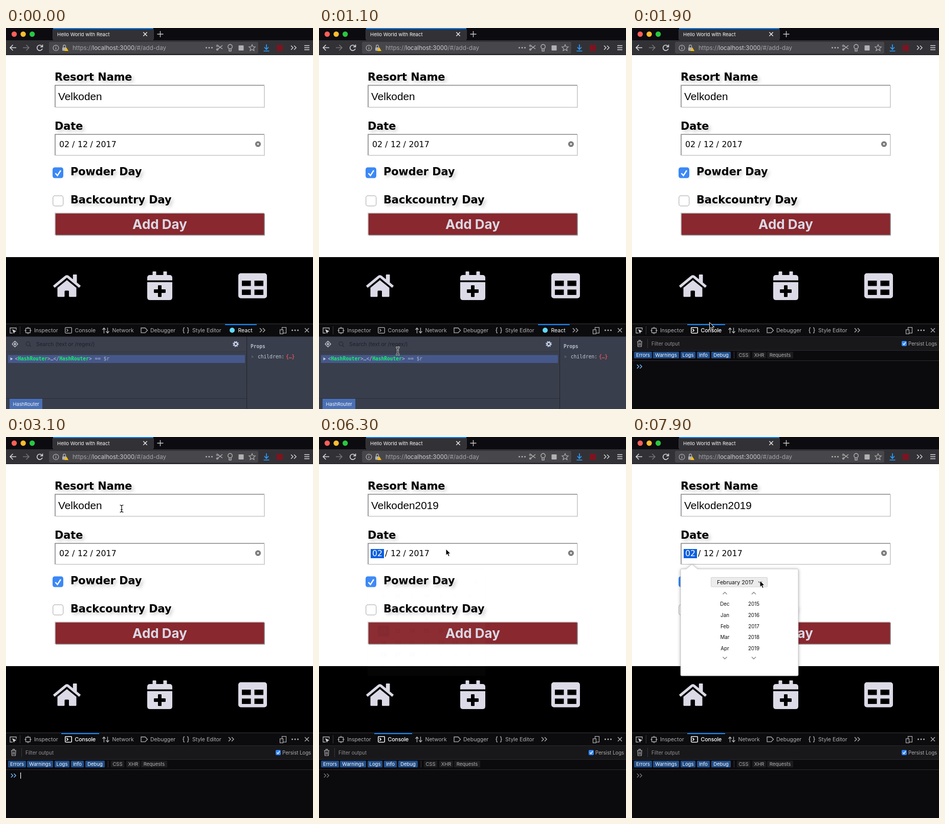
Recreate the animation shown at these times as an HTML page. Size 600 px wide and 745 px high, loop 8000 ms.

```html
<!DOCTYPE html>
<html lang="en">
<head>
<meta charset="utf-8">
<title>Add day form</title>
<style>
html, body { margin: 0; width: 100%; height: 100%; overflow: hidden; background: #fff; }
svg { display: block; font-family: Inter, "Open Sans", sans-serif; }
text { white-space: pre; }
.label { font: bold 20.8px "DejaVu Sans", sans-serif; filter: drop-shadow(4px 4px 3px rgba(0,0,0,.2)); }
.field { font: 20.8px "Liberation Sans", sans-serif; }
.date { font: 15.8px "DejaVu Sans", sans-serif; }
.mono { font: 9.6px "DejaVu Sans Mono", monospace; }
.bold { font-weight: bold; }
.mid { text-anchor: middle; }
</style>
</head>
<body>
<svg id="stage" width="600" height="745" viewBox="0 0 600 745"></svg>
<script>
const LOOP = 8000, STEP = 100;
const RESORT = 'Velkoden', TYPED = '2019', KEYS = [3800, 4100, 4300, 4500];
const CLICK = { tab: 1500, resort: 3400, date: 6100, popup: 6300, month: 7400 };
const GREY = '#b1b1b3', BLUE = '#0a84ff', ICON = '#dcdae6';

const rect = (x, y, w, h, fill, more = '') =>
  `<rect x="${x}" y="${y}" width="${w}" height="${h}" fill="${fill}" ${more}/>`;
const text = (x, y, s, size, fill, cls = '', id = '') =>
  `<text x="${x}" y="${y}" font-size="${size}" fill="${fill}" class="${cls}" id="${id}">${s}</text>`;
const line = (d, stroke, w = 1, more = '') =>
  `<path d="${d}" fill="none" stroke="${stroke}" stroke-width="${w}" ${more}/>`;
const dot = (x, y, r, fill, more = '') => `<circle cx="${x}" cy="${y}" r="${r}" fill="${fill}" ${more}/>`;
const ring = (x, y, r, stroke, w = 1) => dot(x, y, r, 'none', `stroke="${stroke}" stroke-width="${w}"`);
const cross = (x, y, r, color, w) =>
  line(`M${x - r} ${y - r}l${2 * r} ${2 * r}m0 ${-2 * r}l${-2 * r} ${2 * r}`, color, w);
const dots = (x, y, color) => [-5.5, 0, 5.5].map(d => dot(x + d, y, 1.5, color)).join('');
const chevrons = (x, y, color, r = 4) =>
  line(`M${x - r - 1} ${y - r}l${r} ${r}l${-r} ${r}M${x + 1} ${y - r}l${r} ${r}l${-r} ${r}`, color, 1.4);
const bevel = (x, y, w, h, lit, shade, fill) =>
  rect(x, y, w, h, fill, 'rx="3"') +
  line(`M${x + w} ${y + 1}V${y + h}H${x + 1}`, shade, 1.6) +
  line(`M${x} ${y + h}V${y}H${x + w}`, lit, 1.6);

function browserBar() {
  const lights = ['#ff5f57', '#febc2e', '#28c840'];
  return rect(0, 0, 600, 25, '#0c0b10') + rect(92, 0, 196, 25, '#323236') + rect(92, 0, 196, 2, BLUE) +
    lights.map((c, i) => dot(16 + 17.6 * i, 12, 5.2, c)).join('') +
    text(100, 16, 'Hello World with React', 9.6, '#f9f9fa') + cross(272, 12, 3.7, '#eee', 1.4) +
    line('M301.5 6v12m-6-6h12', '#ccc', 1.3) + line('M288.5 3v19M91.5 3v19', '#38383d') +
    rect(0, 24, 600, 29, '#323236') + rect(0, 52, 600, 1, '#17171a') +
    rect(84, 27, 409, 23, '#47474b', 'rx="3"') +
    line('M20 38.500h-12m5.500-5.500l-5.500 5.500l5.500 5.500', '#d7d7db', 1.6) +
    line('M33 38.500h12m-5.500-5.500l5.500 5.500l-5.500 5.500', '#737377', 1.6) +
    line('M70.500 36a5.300 5.300 0 1 0 .5 4.500M71.500 32.500v4.500h-4.500', '#d7d7db', 1.6) +
    ring(97.5, 39, 5.4, GREY, 1.2) + line('M97.500 38v4m0-6.500v1.300', GREY, 1.3) +
    rect(110, 38, 8, 6.5, GREY, 'rx="1"') + line('M111.800 38v-2.500a2.300 2.300 0 0 1 4.600 0v2.500', GREY, 1.4) +
    '<path d="M118 38l4 7h-8z" fill="#ffbf00"/>' +
    text(130, 43, 'https://<tspan fill="#cfcfd2">localhost:3000</tspan>/#/add-day', 11.6, '#a4a4a8') +
    dots(397, 38.5, GREY) +
    line('M412 33l11 8M412 43l11-9', GREY, 1.3) + ring(413, 35, 1.8, GREY) + ring(413, 42, 1.8, GREY) +
    ring(438, 36.5, 4.2, GREY, 1.4) + line('M436 41v4h4v-4', GREY, 1.4) +
    rect(454.500, 34, 10, 10, GREY, 'rx="1"') +
    line('M481 32.500l1.800 4 4.400.4-3.300 3 1 4.300-3.900-2.300-3.900 2.300 1-4.300-3.300-3 4.400-.4z', GREY, 1.2) +
    line('M509 32v10m-4-4.500l4 4.500l4-4.500M503.500 45h11', '#2b9cff', 1.7) +
    rect(529, 33, 12, 12, '#7c1420') + chevrons(562, 38.5, '#d7d7db') +
    line('M583 34.500h10m-10 4h10m-10 4h10', '#d7d7db', 1.6);
}

function form() {
  return rect(0, 53, 600, 395, '#fff') +
    [['Resort Name', 95, 103], ['Date', 95, 199], ['Powder Day', 126, 288], ['Backcountry Day', 126, 343]]
      .map(([s, x, y]) => text(x, y, s, 20.8, '#000', 'label')).join('') +
    bevel(96, 112, 409, 43, '#87878a', '#c8c8ca', '#fff') + bevel(96, 208, 409, 41, '#87878a', '#c8c8ca', '#fff') +
    text(102, 141, RESORT, 20.8, '#000', 'field', 'resort') + rect(0, 122, 1.3, 25, '#000', 'id="caret"') +
    rect(101, 219, 26, 18, '#0a5fe0', 'id="segment"') + text(104, 233, '02', 15.8, '#000', 'date', 'month') +
    [[129, '/'], [140, '12'], [164.5, '/'], [175.5, '2017']].map(([x, s]) => text(x, 233, s, 15.8, '#000', 'date')).join('') +
    dot(492.5, 227, 5.5, '#737376') + cross(492.5, 227, 2.1, '#fff', 1.3) +
    rect(91, 272.5, 21, 21, '#3b88f6', 'rx="4.500"') + line('M96.500 284l4 4.500l6.500-10', '#fff', 2.4) +
    rect(91.700, 328, 20, 20, '#fff', 'rx="4" stroke="#c2c2c5" stroke-width="1.500"') +
    bevel(96, 362, 409, 43, '#bdb9bb', '#858184', '#89282e') +
    text(300.5, 393, 'Add Day', 26, '#dad8e4', 'mid bold');
}

function nav() {
  const cells = [461, 485.5].flatMap(x => [494, 511.5].map(y => rect(x, y, 17.5, 10.5, '#000'))).join('');
  return rect(0, 448, 600, 130, '#000') +
    line('M93.500 506L117 486.500q2-1.500 4 0L144.500 506', ICON, 5, 'stroke-linejoin="round"') +
    rect(130.8, 482, 7.7, 16, ICON, 'rx="1"') +
    `<path d="M100.500 508L119 493l18.500 15v16.500q0 1.200-1.500 1.200h-11.500q-1.500 0-1.500-1.500V515q0-1.500-1.500-1.500h-5.500q-1.500 0-1.500 1.500v9.200q0 1.500-1.500 1.500H102q-1.500 0-1.500-1.200z" fill="${ICON}"/>` +
    `<path d="M276 493.500v-5q0-5.500 5.500-5.500h38q5.500 0 5.500 5.500v5zM276 497h49v29.500q0 5.500-5.500 5.500h-38q-5.500 0-5.500-5.500z" fill="${ICON}"/>` +
    rect(286.5, 476, 7, 10, ICON, 'rx="1"') + rect(307.5, 476, 7, 10, ICON, 'rx="1"') +
    rect(289, 511, 23, 7, '#000', 'rx="1.200"') + rect(297, 503, 7, 23, '#000', 'rx="1.200"') +
    rect(454, 479.5, 56, 49, ICON, 'rx="5"') + cells;
}

const consoleIcon = c => rect(115.7, 585.7, 12.6, 11, 'none', `rx="1.500" stroke="${c}" stroke-width="1.300"`) +
  line('M118.500 588.500l2.700 2.700l-2.700 2.700', c, 1.3);

function toolTabs() {
  const names = [[55, 'Inspector'], [134.5, 'Console'], [207.5, 'Network'], [282, 'Debugger'], [364, 'Style Editor']];
  return rect(0, 578, 600, 26, '#0c0c0e') + rect(0, 578, 600, 1, '#38383d') + rect(0, 603, 600, 1, '#2a2a2e') +
    names.map(([x, s]) => text(x, 595, s, 10.5, GREY)).join('') +
    line('M13 596.500h-5v-10h12v4', GREY, 1.3) + '<path d="M12 589l8.500 4-3.500 1.200-1.500 3.500z" fill="#d7d7db"/>' +
    line('M27.500 583v16', '#38383d') +
    rect(38.5, 587, 9, 9, 'none', `rx="1" stroke="${GREY}" stroke-width="1.300"`) +
    line('M43 584.500v3m0 8v3m-6.500-7h3m7 0h3', GREY, 1.3) + consoleIcon(GREY) +
    line('M191.500 597v-10m-3 3l3-3.500l3 3.500M198.500 586v10m-3-3l3 3.500l3-3.500', GREY, 1.3) +
    line('M264 586.500h8l4.500 4.700-4.500 4.700h-8z', GREY, 1.3) +
    line('M349 586q-2 0-2 2v1.500q0 1.700-1.500 1.700q1.500 0 1.500 1.700v1.500q0 2 2 2M354 586q2 0 2 2v1.500q0 1.700 1.500 1.700q-1.500 0-1.500 1.700v1.500q0 2-2 2', GREY, 1.3) +
    rect(539.5, 585.5, 8, 11, 'none', `stroke="${GREY}" stroke-width="1.200"`) +
    rect(535.5, 590, 6, 8, '#0c0c0e', `stroke="${GREY}" stroke-width="1.200"`) +
    dots(565, 591, GREY) + cross(588, 591, 4, GREY, 1.4);
}

function reactPanel() {
  const green = s => `<tspan class="bold" fill="#12f56a">${s}</tspan>`;
  return rect(428, 579, 62, 2, BLUE) + dot(442, 591, 5, '#61dafb') + text(453.5, 595, 'React', 10.5, '#fff') +
    chevrons(501, 591, GREY) + rect(0, 604, 600, 141, '#393e4c') + rect(0, 604, 470, 28, '#3c404d') +
    rect(0, 632, 470, 1, '#343946') + rect(470, 604, 1, 141, '#20232b') +
    ring(17.5, 618, 4.3, '#d0d3da', 1.2) + dot(17.5, 618, 2, '#d0d3da') +
    line('M17.500 611.500v3m0 7v3m-6.500-6.500h3m7 0h3', '#d0d3da', 1.2) +
    ring(43, 617.5, 3.8, '#272a33', 1.2) + line('M45.800 620.300l3 3', '#272a33', 1.3) +
    text(59, 622, 'Search (text or /regex/)', 10.4, '#1d2028') +
    ring(449, 618, 3.2, '#c3d0e8', 2.4) + dot(449, 618, 5, 'none', 'stroke="#c3d0e8" stroke-width="1.800" stroke-dasharray="2 1.927"') +
    rect(4, 639.5, 463, 15.5, '#46588a') + '<path d="M8.500 644l5 3l-5 3z" fill="#c3cbdc"/>' +
    text(17.5, 650, `&lt;${green('HashRouter')}&gt;…&lt;/${green('HashRouter')}&gt; <tspan fill="#aab4cc">== $r</tspan>`, 9.6, '#b9c4da', 'mono') +
    text(478, 626, 'Props', 9.6, '#b4bccb', 'mono bold') + '<path d="M480 640l4.500 2.700l-4.500 2.700z" fill="#555b6b"/>' +
    text(492, 645.5, 'children:', 9.6, '#c3cad8', 'mono') + text(547, 645.5, '{…}', 9.6, '#d8555f', 'mono bold') +
    rect(0, 724, 470, 1, '#2b2f3a') + rect(7, 725, 64, 20, '#4a70b5') + text(13.5, 739, 'HashRouter', 9.3, '#f0f3fa');
}

function consolePanel() {
  const on = [[4, 35, 'Errors'], [41, 51, 'Warnings'], [95, 29, 'Logs'], [127, 25, 'Info'], [155, 38, 'Debug']];
  const off = [[205, 26, 'CSS'], [235, 27, 'XHR'], [264, 51, 'Requests']];
  const pills = (list, bg, fg) => list.map(([x, w, s]) =>
    rect(x, 633, w, 13, bg, 'rx="1.500"') + text(x + w / 2, 643, s, 9.5, fg, 'mid')).join('');
  return rect(108, 579, 74, 2, BLUE) + consoleIcon('#fff') + text(134.5, 595, 'Console', 10.5, '#fff') +
    chevrons(440, 591, GREY) + rect(0, 604, 600, 141, '#0b0a0d') + rect(0, 604, 600, 26, '#18181b') +
    line('M0 630.500h600M0 650.500h600', '#2b2b30') + line('M30.500 608v18M199.500 633v13', '#38383d') +
    line('M10 613h10m-6.500-.500v-2h3v2M11 613.500l.6 9.500h6.800l.6-9.500M13.800 615.500v5.500m2.500-5.500v5.500', GREY, 1.2) +
    text(38, 621, 'Filter output', 9.7, '#929296') +
    rect(527, 612, 10, 10, '#2f86f6', 'rx="2"') + line('M529.500 617l2 2.300l3.300-5', '#fff', 1.4) +
    text(540, 621, 'Persist Logs', 9.7, GREY) + pills(on, '#204e8a', '#fff') + pills(off, '#1c1c1f', GREY) +
    `<g id="prompt">${chevrons(14.5, 662, '#75bfff', 3.7)}</g><g id="promptOff">${chevrons(14.5, 662, '#77777b', 3.7)}</g>` +
    rect(28, 656, 1.2, 12, '#fff', 'id="consoleCaret"');
}

function popup() {
  const years = [2015, 2016, 2017, 2018, 2019];
  const spinner = (x, items) =>
    line(`M${x - 4} 307.500l4-4l4 4M${x - 4} 430l4 4l4-4`, '#858588', 1.4) +
    items.map((s, i) => text(x, 330 + 21.8 * i, s, 9.8, '#111', 'mid')).join('');
  let days = [...'SMTWTFS'].map((s, i) => text(126 + 28 * i, 314, s, 9.5, '#777', 'mid')).join('');
  for (let i = 0; i < 42; i++) {
    const date = new Date(2017, 0, 29 + i), x = 126 + 28 * (i % 7), y = 337 + 23 * Math.floor(i / 7);
    const inMonth = date.getMonth() === 1, picked = inMonth && date.getDate() === 12;
    if (picked) days += rect(x - 11, y - 14, 22, 21, BLUE, 'rx="2"');
    days += text(x, y, date.getDate(), 9.8, picked ? '#fff' : inMonth ? '#111' : '#aaa', 'mid');
  }
  return `<g id="popup"><path d="M97 258H106l11-9l11 9H323q2 0 2 2v205q0 2-2 2H97q-2 0-2-2V260q0-2 2-2z" fill="#fff" stroke="#bdbdc0" stroke-width=".8" style="filter:drop-shadow(0 1px 3px rgba(0,0,0,.3))"/>` +
    rect(154.5, 274.5, 110, 18.5, '#ececed', 'id="header" rx="1.500" stroke="#d2d2d4"') +
    text(166, 288, 'February 2017', 10.7, '#111') +
    `<g id="days">${line('M116 280l-4 4l4 4M304 280l4 4l-4 4', '#666', 1.4)}${days}</g>` +
    `<g id="months">${line('M247 282.500l3.500 3.500l3.500-3.500', '#666', 1.3)}${spinner(181.5, ['Dec', 'Jan', 'Feb', 'Mar', 'Apr'])}${spinner(238, years)}</g></g>`;
}

const pointers = '<path id="arrow" d="M0 0v12.500l2.900-2.700l2 4.700l2.300-1l-2-4.500h4z" fill="#000" stroke="#fff" stroke-width="1"/>' +
  ['#fff|3', '#000|1.2'].map(s => s.split('|')).reduce((g, [c, w]) =>
    g + line('M-3.500-7q3 0 3.500 2q.5-2 3.500-2M0-5V5M-3.500 7q3 0 3.500-2q.5 2 3.500 2M-2 2h4', c, w), '<g id="beam">') + '</g>';

const stage = document.getElementById('stage');
stage.innerHTML = browserBar() + form() + nav() + toolTabs() +
  `<g id="react">${reactPanel()}</g><g id="console">${consolePanel()}</g>` + popup() + pointers;
const el = {};
stage.querySelectorAll('[id]').forEach(n => { if (n.id) el[n.id] = n; });
const show = (id, on) => { el[id].style.display = on ? '' : 'none'; };

// Pointer path: time, x, y
const path = [[600, 250, 760], [1000, 161, 653], [1200, 147, 610], [1400, 149, 591], [1800, 149, 591],
  [2700, 224, 146], [3100, 226, 140], [5400, 226, 140], [6000, 248, 219], [6500, 248, 219], [7000, 250, 281], [LOOP, 250, 281]];

function pointerAt(t) {
  const i = Math.max(1, path.findIndex(p => p[0] >= t));
  const [t0, x0, y0] = path[i - 1], [t1, x1, y1] = path[i];
  let k = Math.max(0, (t - t0) / (t1 - t0));
  if (t > 1400) k = k * k * (3 - 2 * k);
  return [x0 + (x1 - x0) * k, y0 + (y1 - y0) * k];
}

function draw(t) {
  const onConsole = t >= CLICK.tab, promptFocus = t < CLICK.resort;
  show('react', !onConsole);
  show('console', onConsole);
  show('prompt', promptFocus);
  show('promptOff', !promptFocus);
  show('consoleCaret', promptFocus && t % 1000 < 500);

  const typed = KEYS.filter(k => t >= k).length;
  el.resort.textContent = RESORT + TYPED.slice(0, typed);
  el.caret.setAttribute('x', 102.5 + el.resort.getComputedTextLength());
  const since = t - (typed ? KEYS[typed - 1] : CLICK.resort);
  show('caret', !promptFocus && t < CLICK.date && since % 1000 < 500);

  const dateFocus = t >= CLICK.date;
  show('segment', dateFocus);
  el.month.setAttribute('fill', dateFocus ? '#fff' : '#000');

  const [x, y] = pointerAt(t);
  show('popup', t >= CLICK.popup);
  el.popup.setAttribute('opacity', Math.min(1, 0.02 + (t - CLICK.popup) / 200));
  show('header', y > 274 && t > CLICK.popup);
  show('days', t < CLICK.month);
  show('months', t >= CLICK.month);

  const visible = t >= 600 && (t < 3700 || t >= 5400);
  const overText = (y > 111 && y < 156) || (!onConsole && y > 605 && y < 632);
  show('arrow', visible && !overText);
  show('beam', visible && overText);
  for (const id of ['arrow', 'beam']) el[id].setAttribute('transform', `translate(${x} ${y})`);
}

function frame(now) {
  draw(Math.floor(now % LOOP / STEP) * STEP);
  requestAnimationFrame(frame);
}
draw(0);
requestAnimationFrame(frame);
</script>
</body>
</html>
```
